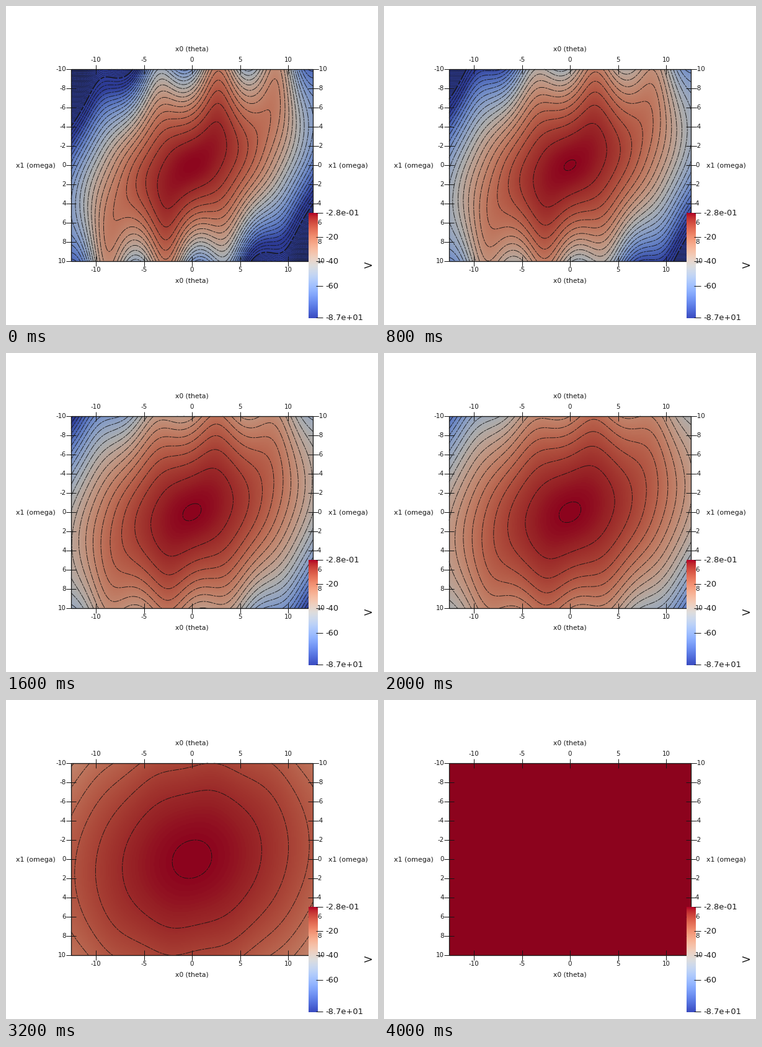
Recreate the animation shown at these times as a matplotlib script. Size 600x515 px, loop 4.2 s.

```python
import numpy as np
import matplotlib.pyplot as plt
from matplotlib.animation import FuncAnimation

WIDTH, HEIGHT, DPI = 600, 515, 100
FRAMES, INTERVAL = 21, 200
LEFT, RIGHT, TOP, BOTTOM = 105, 495, 102, 412
CX, CY, UNIT = 300, 257, 15.5
PX = 72 / DPI
FULL_SCALE = 203      # cost mapped to the blue end of the colours
FIRST, STEP = 0.9, 9.5
EDGE = 230            # heavy contour where the colour range ends
INK = "#161616"

plt.rcParams["font.family"] = "DejaVu Sans"
cmap = plt.get_cmap("coolwarm")

fig = plt.figure(figsize=(WIDTH / DPI, HEIGHT / DPI), dpi=DPI, facecolor="white")
ax = fig.add_axes([0, 0, 1, 1])
ax.axis("off")

px, py = np.meshgrid(np.linspace(LEFT, RIGHT, 261), np.linspace(TOP, BOTTOM, 209))
theta, rate = (px - CX) / UNIT, (CY - py) / UNIT


def cost(left):
    """Cost to go when the fraction `left` of the horizon remains."""
    tilt = 0.95 * left ** 0.8
    ripple = 0.36 * left ** 1.35
    phase = 0.5 + 0.4 * (1 - left)
    wave = ripple * np.cos(theta * np.sign(rate) + phase)
    running = theta ** 2 + (1.04 + wave) * rate ** 2 - tilt * theta * rate
    return left * running + FIRST * left ** 1.6


def shade(value):
    return 0.78 * cmap(np.clip(1 - value / FULL_SCALE, 0, 1))[..., :3]


def line(x0, y0, x1, y1, width=1, z=3):
    ax.plot([x0, x1], [y0, y1], color=INK, lw=width * PX, zorder=z,
            solid_capstyle="butt")


def text(x, y, label, size=10.3, ha="center", z=4):
    ax.text(x, y - 1, label, fontsize=size * PX, color=INK, ha=ha,
            va="center_baseline", zorder=z)


def draw_axes():
    for y in (TOP, BOTTOM):
        line(LEFT, y, RIGHT, y, 1.3)
    for x in (LEFT, RIGHT):
        line(x, TOP, x, BOTTOM, 1.3)
    for value in range(-10, 11, 5):
        x = CX + value * UNIT
        line(x, TOP - 7, x, TOP + 8)
        line(x, BOTTOM - 8, x, BOTTOM + 8)
        for y in (87, 426):
            text(x, y, str(value))
    for value in range(-10, 11, 2):
        y = CY + value * UNIT
        line(LEFT - 8, y, LEFT + 8, y)
        line(RIGHT - 8, y, RIGHT + 8, y)
        text(97, y, str(value), ha="right")
        text(502, y, str(value), ha="left")
    for y in (69, 444):
        text(CX, y, "x0 (theta)", 10.7)
    for x in (48, 552):
        text(x, CY + 1, "x1 (omega)", 11)


def draw_colorbar():
    ramp = cmap(np.linspace(1, 0, 170))[:, None, :3]
    ax.imshow(ramp, extent=(488, 503, 504, 334), aspect="auto", zorder=5)
    labels = {334: "-2.8e-01", 373: "-20", 412: "-40", 452: "-60", 503: "-8.7e+01"}
    for y, label in labels.items():
        line(500, y, 511, y, z=6)
        text(515.5, y, label, 13, ha="left", z=6)
    ax.text(586, 418, "V", fontsize=15 * PX, color=INK, rotation=90,
            ha="center", va="center", zorder=6)


surface = ax.imshow(shade(cost(1)), extent=(LEFT, RIGHT, BOTTOM, TOP),
                    aspect="auto", interpolation="bilinear", zorder=0)
draw_axes()
draw_colorbar()
ax.set_xlim(0, WIDTH)
ax.set_ylim(HEIGHT, 0)

LEVELS = np.concatenate([np.arange(FIRST, EDGE - 3, STEP), [EDGE],
                         np.arange(EDGE + STEP / 2, 450, STEP / 2)])
contours = []


def contour_width(level):
    if level == EDGE:
        return 1.6 * PX
    return (0.85 if level < EDGE else 0.5) * PX


def update(frame):
    while contours:
        contours.pop().remove()
    value = cost(1 - frame / (FRAMES - 1))
    surface.set_data(shade(value))
    levels = LEVELS[(LEVELS > value.min() + 0.01) & (LEVELS < value.max())]
    if levels.size:
        lines = ax.contour(px, py, value, levels=levels, colors="#141414",
                           linewidths=[contour_width(v) for v in levels], zorder=1)
        lines.set_linestyle([(0, (12, 1.4, 4, 1.4))])
        contours.append(lines)
    ax.set_xlim(0, WIDTH)
    ax.set_ylim(HEIGHT, 0)
    return [surface]


animation = FuncAnimation(fig, update, frames=FRAMES, interval=INTERVAL,
                          repeat=True, repeat_delay=0, blit=False)
plt.show()
```
